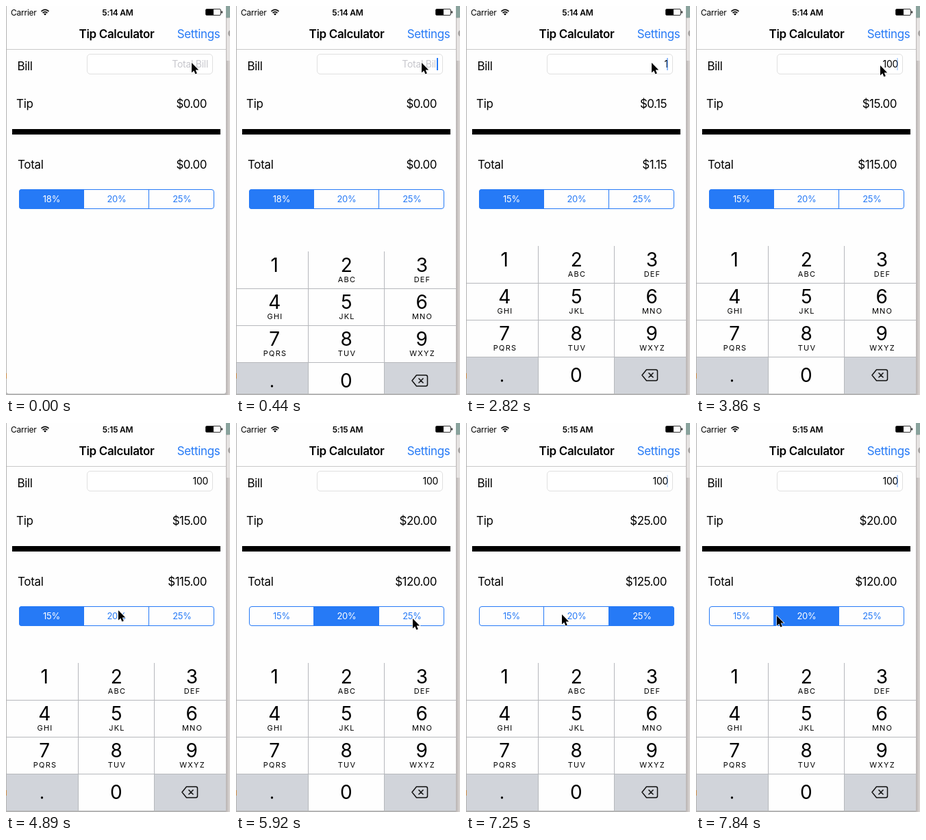
These frames come from a looping animation (327 px wide and 569 px high, 7990 ms). An HTML page:

```html
<!DOCTYPE html>
<html lang="en">
<head>
<meta charset="utf-8">
<title>Tip Calculator</title>
<style>
  html, body { margin: 0; width: 100%; height: 100%; overflow: hidden; }
  svg { display: block; width: 327px; height: 569px; font: 17px Inter, "Liberation Sans", sans-serif; }
  text { letter-spacing: -.02em; }
  .end { text-anchor: end; }
  .mid { text-anchor: middle; }
  .amount { letter-spacing: -.03em; text-anchor: end; }
  .status { font-size: 12px; }
  .field { font-size: 14px; text-anchor: end; }
  .seg { font-size: 13px; text-anchor: middle; }
  .digit { font-size: 28px; text-anchor: middle; }
  .letters { font-size: 11px; letter-spacing: 1.2px; text-anchor: middle; }
  .blue { fill: #267af6; }
</style>
</head>
<body>
<svg viewBox="0 0 327 569">
  <defs>
    <clipPath id="screen"><rect x="1" width="320" height="567"/></clipPath>
    <clipPath id="pill"><rect x="19" y="268" width="285" height="29" rx="4"/></clipPath>
    <linearGradient id="shade">
      <stop stop-color="#b9b4b3"/><stop offset="1" stop-color="#dcd7d5"/>
    </linearGradient>
  </defs>

  <!-- desktop behind the window -->
  <rect width="327" height="569" fill="#b4b4b4"/>
  <rect x="321" width="6" height="569" fill="url(#shade)"/>
  <rect x="321" width="6" height="17" fill="#8aa39d"/>
  <rect x="322" y="18" width="5" height="62" fill="#e6e3e2"/>
  <circle cx="329" cy="40" r="5" fill="#a9a6a5"/>
  <rect y="537" width="1" height="8" fill="#c98a45"/>
  <path d="M1 0H321V564Q321 567 318 567H4Q1 567 1 564Z" fill="#fefefe"/>

  <!-- status and navigation bars -->
  <text class="status" x="7" y="13.5">Carrier</text>
  <g fill="none" stroke="#000" stroke-width="1.7">
    <path d="M51.5 7.8Q57 2.800 62.500 7.800M53.600 10.200Q57 7.200 60.400 10.200"/>
  </g>
  <path d="M55 11.600Q57 10 59 11.600L57 13.800Z"/>
  <text class="status mid" id="clock" x="163" y="13.500" font-weight="600"></text>
  <rect x="291.500" y="4.500" width="22" height="9" rx="1.500" fill="none" stroke="#333"/>
  <path d="M292 5H303V13H292ZM314.500 7.500H316V10.500H314.500Z"/>
  <text class="mid" x="161.500" y="47" font-weight="600">Tip Calculator</text>
  <text class="end blue" x="312.500" y="47">Settings</text>
  <path d="M1 63.500H321" stroke="#c9c9c9"/>

  <!-- form -->
  <rect x="118.500" y="70.500" width="183" height="29" rx="4.500" fill="#fff" stroke="#e0e0e0"/>
  <text x="16.500" y="94">Bill</text>
  <text x="15" y="149">Tip</text>
  <text x="17" y="238">Total</text>
  <text class="field" id="bill" x="295" y="90"></text>
  <rect class="blue" id="caret" x="293" y="76" width="2" height="18"/>
  <text class="amount" id="tip" x="293" y="149"></text>
  <text class="amount" id="total" x="293" y="238"></text>
  <rect x="9" y="180" width="304" height="8"/>

  <g id="segments" clip-path="url(#pill)"></g>
  <rect x="19.500" y="268.500" width="284" height="28" rx="3.500" fill="none" stroke="#267af6"/>
  <path d="M113.500 268V297M208.500 268V297" stroke="#267af6"/>
  <g id="labels"></g>

  <g clip-path="url(#screen)"><g id="keyboard">
    <rect x="1" y="351" width="320" height="216" fill="#fefefe"/>
    <path d="M1 513H105V567H1ZM217 513H321V567H217Z" fill="#d1d4da"/>
    <path d="M105.500 351V567M216.500 351V567M1 405.500H321M1 459.500H321M1 513.500H321" stroke="#b6b8bc"/>
    <g id="keys"></g>
    <circle cx="52.500" cy="548" r="1.700"/>
    <path d="M263.500 532H277Q279.500 532 279.500 534.500V545.500Q279.500 548 277 548H263.500L257 540Z M266.500 536.500L273.500 543.500M273.500 536.500L266.500 543.500"
      fill="none" stroke="#111" stroke-width="1.500" stroke-linejoin="round"/>
  </g></g>

  <path id="pointer" d="M0 0V14.500L3.300 11.400 5.400 16.500 7.800 15.500 5.700 10.500H10.200Z" stroke="#fff" stroke-width="1.200" paint-order="stroke"/>
</svg>

<script>
const LOOP = 7990, TICK = LOOP / 54;
const BLUE = '#267af6';
const $ = id => document.getElementById(id);
const clamp = v => Math.max(0, Math.min(1, v));

function add(parent, tag, attrs, text = '') {
  const el = document.createElementNS('http://www.w3.org/2000/svg', tag);
  for (const name in attrs) el.setAttribute(name, attrs[name]);
  el.textContent = text;
  return $(parent).appendChild(el);
}

const columns = [56, 161, 271];
['', 'ABC', 'DEF', 'GHI', 'JKL', 'MNO', 'PQRS', 'TUV', 'WXYZ'].forEach((letters, i) => {
  const x = columns[i % 3], y = 381 + 54 * Math.floor(i / 3);
  add('keys', 'text', { class: 'digit', x, y }, i + 1);
  add('keys', 'text', { class: 'letters', x: x + 1, y: y + 15 }, letters);
});
add('keys', 'text', { class: 'digit', x: 160.5, y: 550 }, 0);

const fills = [], labels = [];
[66.5, 161.5, 257].forEach((x, i) => {
  fills.push(add('segments', 'rect', { x: 19 + 95 * i, y: 268, width: 95, height: 29, fill: BLUE }));
  labels.push(add('labels', 'text', { class: 'seg', x, y: 287 }));
});

// All keyed lists start with the tick at which the entry applies.
const typed = [[0, ''], [12, '1'], [20, '10'], [22, '100']];
const rates = [[0, 15], [35, 20], [44, 25], [51, 20]];
const taps = [[0, 0, 0], [34, 0, 1], [43, 1, 2], [50, 2, 1]];
const blinks = [[0, 4.7], [12, 15.5], [20, 25.5]];
const path = [
  [0, 271, 83], [5, 271, 83], [6, 270, 83], [7, 270, 83], [8, 271, 83], [25, 271, 83],
  [26, 269, 87], [29, 235, 160], [31, 190, 240], [33, 164, 274], [36, 164, 274],
  [38, 196, 281], [40, 258, 286], [41, 262, 289], [43, 264, 283], [46, 264, 283],
  [49, 140, 280], [50, 118, 282], [54, 118, 282]
];

const latest = (list, n) => list.filter(entry => entry[0] <= n).pop();

function pointerAt(n) {
  const i = path.findIndex(p => p[0] > n);
  const [a, x, y] = path[i - 1], [b, x2, y2] = path[i];
  const k = (n - a) / (b - a);
  return [x + (x2 - x) * k, y + (y2 - y) * k];
}

function caretOpacity(n) {
  if (n < 1) return 0;
  const age = n - latest(blinks, n)[1];
  if (age < 0) return 1;
  const p = age % 6.76;
  return p < 2 ? clamp(1 - p / 0.7) : clamp(p - 3);
}

function drawSegments(n) {
  const [start, from, to] = latest(taps, n);
  const f = from === to ? 1 : clamp(0.4 * (n - start));
  const names = [n < 12 ? 18 : 15, 20, 25];
  labels.forEach((label, i) => {
    const on = i === to ? f : i === from ? 1 - f : 0;
    fills[i].setAttribute('opacity', i === from && from !== to ? 1 - f * f : on);
    label.textContent = names[i] + '%';
    label.style.fill = `color-mix(in srgb, #fff ${on * 100}%, ${BLUE})`;
  });
}

function draw(n) {
  const bill = latest(typed, n)[1];
  const tip = bill * latest(rates, n)[1] / 100;
  $('clock').textContent = n < 29 ? '5:14 AM' : '5:15 AM';
  $('bill').textContent = bill || 'Total Bill';
  $('bill').style.fill = bill ? '#000' : '#c7c7cd';
  $('tip').textContent = '$' + tip.toFixed(2);
  $('total').textContent = '$' + (+bill + tip).toFixed(2);
  $('caret').setAttribute('opacity', caretOpacity(n));
  drawSegments(n);

  const rise = clamp((n - 1) / 3);
  $('keyboard').setAttribute('transform', `translate(0 ${216 * (1 - rise) ** 3})`);
  $('pointer').setAttribute('transform', `translate(${pointerAt(n)})`);
}

// The screen is sampled in even ticks, so the motion is stepped.
const begin = performance.now();
function loop(now) {
  const t = Math.max(0, now - begin) % LOOP;
  draw(Math.min(53, Math.floor((t + 10) / TICK)));
  requestAnimationFrame(loop);
}
loop(begin);
</script>
</body>
</html>
```
